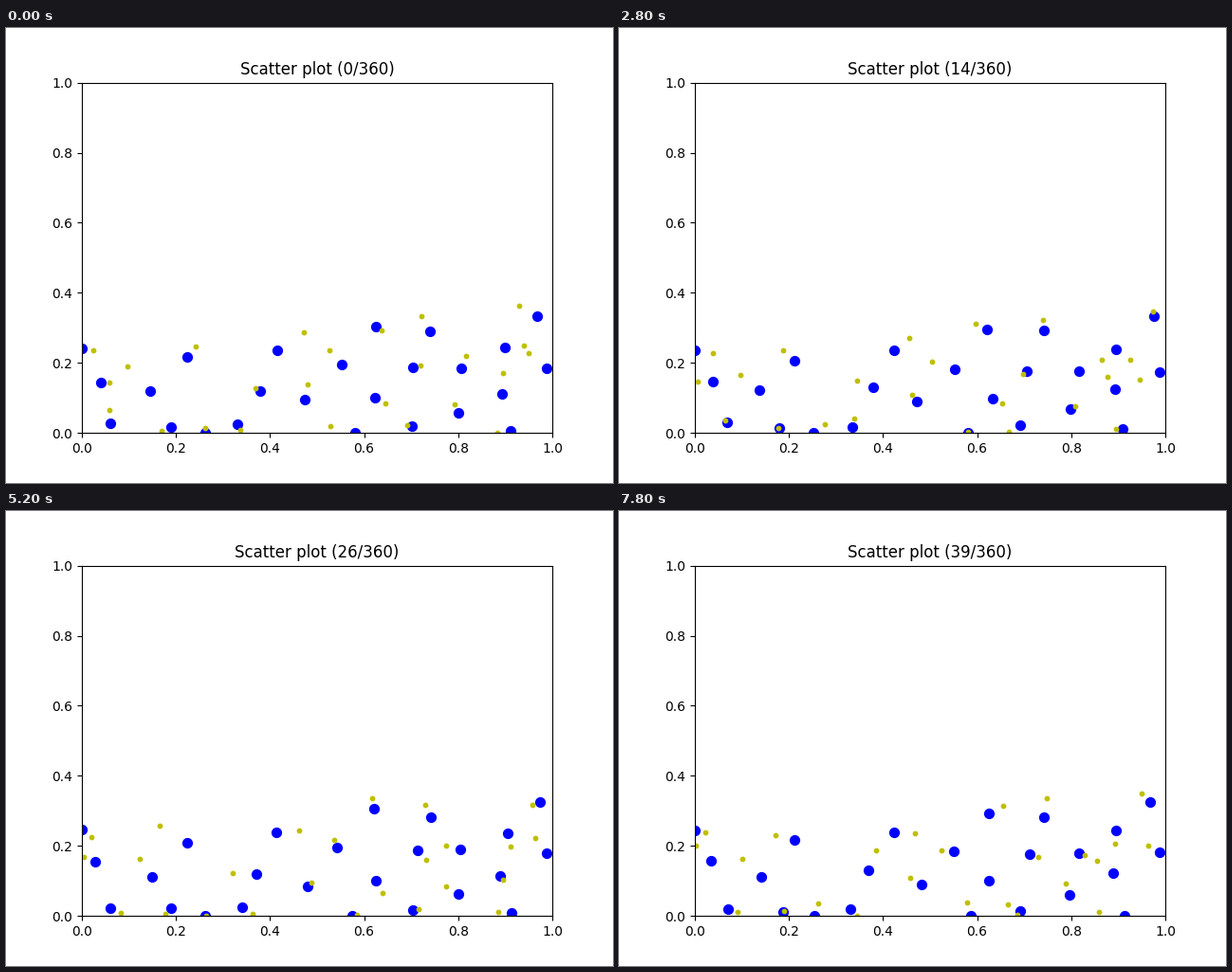
Write a matplotlib script that moves like this. It is 640x480 px and loops after 8000 ms.

```python
import numpy as np
import matplotlib.pyplot as plt
from matplotlib.animation import FuncAnimation

FRAMES, STEP_MS, TOTAL = 40, 200, 360

# Resting place of each big dot, in axes units.
HOME = np.array([
    (0, 0.243), (0.034, 0.151), (0.065, 0.024), (0.143, 0.116),
    (0.186, 0.016), (0.217, 0.211), (0.257, 0), (0.336, 0.021),
    (0.374, 0.124), (0.418, 0.240), (0.477, 0.091), (0.549, 0.189),
    (0.580, 0), (0.622, 0.299), (0.628, 0.099), (0.707, 0.181),
    (0.697, 0.015), (0.737, 0.286), (0.799, 0.064), (0.811, 0.183),
    (0.894, 0.118), (0.900, 0.240), (0.908, 0.007), (0.973, 0.329),
    (0.987, 0.178)])

rng = np.random.default_rng(8)
phase = rng.uniform(0, 2 * np.pi, HOME.shape)
speed = rng.uniform(0.15, 0.5, HOME.shape)
lean = rng.normal(size=HOME.shape) * (0.022, 0.022)
jitter = rng.normal(size=(FRAMES, *HOME.shape)) * (0.018, 0.018)


def big_dots(i):
    """Slow sway around home; dots on a wall or the floor stay on it."""
    sway = 0.006 * np.sin(speed * i + phase)
    return np.clip(HOME + sway * (HOME > 0), 0, 1)


def small_dots(i):
    """Restless companions of the big dots, bouncing off the box edges."""
    pos = big_dots(i) * (1, 1.1) + lean + jitter[i]
    return 1 - np.abs(1 - np.abs(pos))


fig, ax = plt.subplots(figsize=(6.4, 4.8), dpi=100)
ax.set_xlim(0, 1)
ax.set_ylim(0, 1)
big = ax.scatter(*big_dots(0).T, s=50, c="b")
small = ax.scatter(*small_dots(0).T, s=10, c="y")
title = ax.set_title("")


def draw(i):
    big.set_offsets(big_dots(i))
    small.set_offsets(small_dots(i))
    title.set_text(f"Scatter plot ({i}/{TOTAL})")
    return big, small, title


anim = FuncAnimation(fig, draw, frames=FRAMES, interval=STEP_MS,
                     repeat=True, repeat_delay=0)
plt.show()
```
